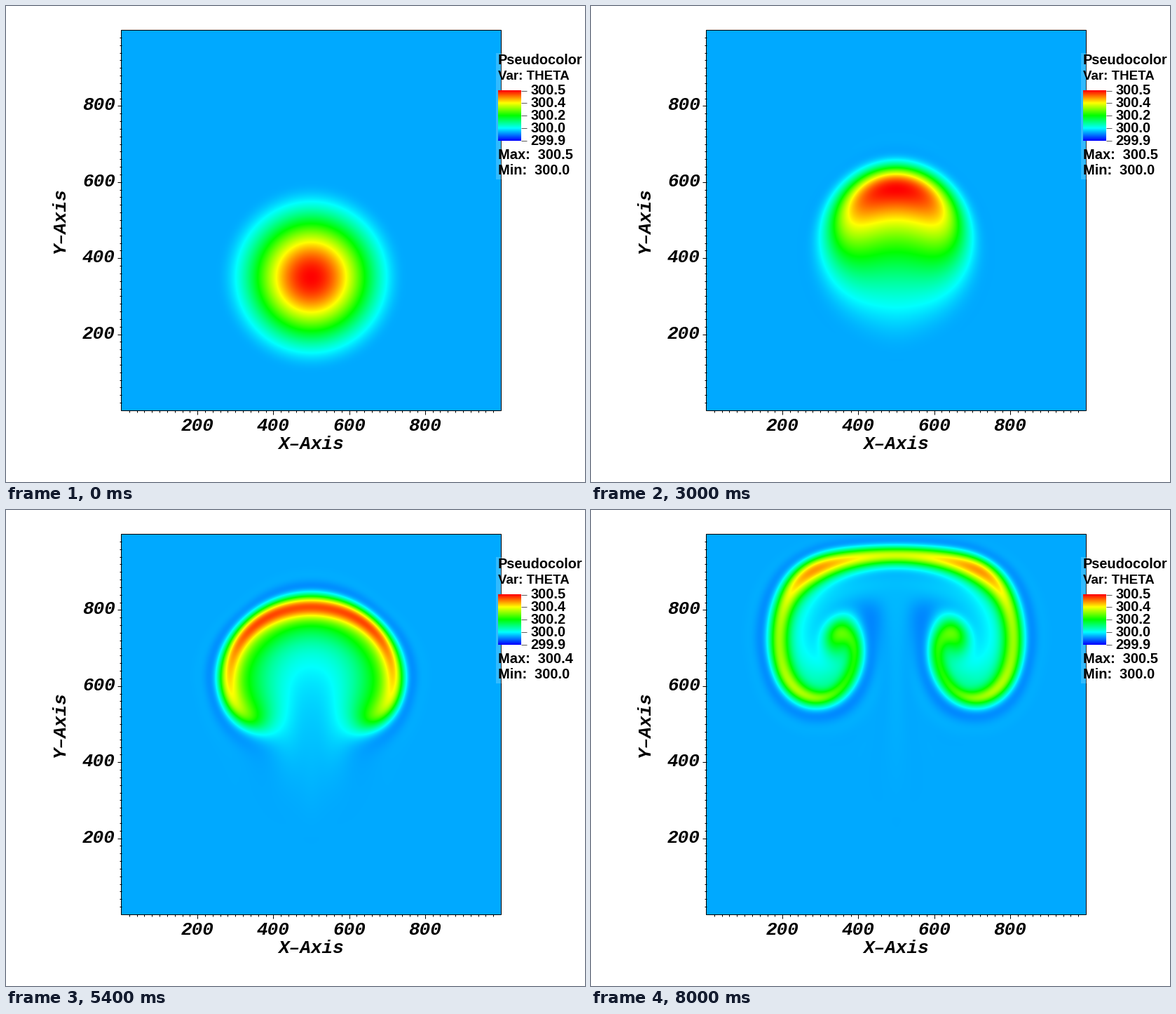
A matplotlib script for the animation above (8200 ms loop, 826x678 px).

```python
import numpy as np
import matplotlib.pyplot as plt
from matplotlib.animation import FuncAnimation
from matplotlib.colors import LinearSegmentedColormap
from matplotlib.patches import Rectangle

W, H, DPI = 826, 678, 100
FRAMES, INTERVAL = 41, 200
LEFT, RIGHT, TOP, BOTTOM = 165, 706, 34, 576

# Rising warm bubble: Boussinesq flow in a closed 1000 m box
N = 100                 # cells per side
CELL = 1000 / N
DT = 3.0                # s
STEPS = 290
BUOYANCY = 9.81 / 300   # g / theta0
HYPER = 15              # weak biharmonic diffusion, m^4/s
UPWIND = 20             # m, spacing of the fifth-order upwind damping

# The vertical axis is mirrored with odd symmetry, which makes the walls.
kx = 2 * np.pi * np.fft.rfftfreq(N, CELL)[None, :]
ky = 2 * np.pi * np.fft.fftfreq(2 * N, CELL)[:, None]
ikx, iky = 1j * kx, 1j * ky
k2 = kx ** 2 + ky ** 2
inv_k2 = 1 / np.where(k2 == 0, 1, k2)
half = np.exp(-HYPER * k2 ** 2 * DT / 2)
full = half ** 2


def damping(k):
    """Sixth difference of a wave, as in a fifth-order upwind scheme."""
    phase = np.minimum(np.abs(k) * UPWIND, np.pi)
    return (2 * np.sin(phase / 2)) ** 6 / (60 * UPWIND)


damp_x, damp_y = damping(kx), damping(ky)


def bubble(x, y):
    r = np.minimum(np.hypot(x - 500, y - 350) / 250, 1)
    return 0.25 * (1 + np.cos(np.pi * r))


def tendency(q):
    psi = -q[1] * inv_k2
    u, v = np.fft.irfft2(np.array([-iky * psi, ikx * psi]))
    qx, qy, dx, dy = np.fft.irfft2(
        np.array([ikx * q, iky * q, damp_x * q, damp_y * q]))
    out = -np.fft.rfft2(u * qx + v * qy + np.abs(u) * dx + np.abs(v) * dy)
    out[1] += BUOYANCY * ikx * q[0]
    return out


def step(q):
    """Runge-Kutta 4 with an integrating factor for the diffusion."""
    a = tendency(q)
    b = tendency(half * (q + DT / 2 * a))
    c = tendency(half * q + DT / 2 * b)
    d = tendency(full * q + DT * half * c)
    return full * q + DT / 6 * (full * a + 2 * half * (b + c) + d)


def simulate():
    x = np.arange(N)[None, :] * CELL
    y = np.arange(2 * N)[:, None] * CELL
    theta = bubble(x, y) - bubble(x, 2000 - y)
    q = np.fft.rfft2(np.array([theta, np.zeros_like(theta)]))
    fields = np.empty((STEPS + 1, N + 1, N + 1))
    for n in range(STEPS + 1):
        if n:
            q = step(q)
        fields[n, :, :N] = np.fft.irfft2(q[0])[:N + 1]
    fields[:, :, N] = fields[:, :, 0]
    return fields


def arrival(height):
    """Step at which the warm front passes a height on the centre line."""
    j, f = divmod(height / CELL, 1)
    j = int(j)
    mid = fields[:, :, N // 2]
    return np.argmax((1 - f) * mid[:, j] + f * mid[:, j + 1] > 0.2)


fields = simulate()

# Playback speed from the front height (m) at a few moments
front = {15: 642, 23: 766, 31: 886, 36: 935}
rate = np.mean([arrival(y) / i for i, y in front.items()])


def field_at(i):
    p = min(i * rate, STEPS - 1)
    j = int(p)
    return fields[j] + (p - j) * (fields[j + 1] - fields[j])


def extremes(i):
    high = 300.4 if 25 <= i < 34 else 300.5
    low = 299.9 if 35 <= i < 39 else 300.0
    return f"Max:  {high:.1f}", f"Min:  {low:.1f}"


fig = plt.figure(figsize=(W / DPI, H / DPI), dpi=DPI, facecolor="white")
cmap = LinearSegmentedColormap.from_list(
    "rainbow5", ["#0000ff", "#00ffff", "#00ff00", "#ffff00", "#ff0000"], 1024)

plot = fig.add_axes([LEFT / W, 1 - BOTTOM / H,
                     (RIGHT - LEFT) / W, (BOTTOM - TOP) / H])
pad = CELL / 2
image = plot.imshow(field_at(0), cmap=cmap, vmin=-0.1, vmax=0.5,
                    origin="lower", aspect="auto", interpolation="bicubic",
                    extent=(-pad, 1000 + pad, -pad, 1000 + pad))
plot.set(xlim=(0, 1000), ylim=(0, 1000))
plot.axis("off")

# Overlay in pixel coordinates, y pointing down
page = fig.add_axes([0, 0, 1, 1])
page.axis("off")
PX = 72 / DPI


def line(x0, y0, x1, y1, width=1):
    page.plot([x0, x1], [y0, y1], color="black", lw=width * PX,
              solid_capstyle="butt")


def label(x, y, text, size, family, **kw):
    kw = {"va": "baseline", **kw}
    return page.text(x, y, text, fontsize=size * PX, family=family,
                     weight="bold", color="black", **kw)


def axis_label(x, y, text, **kw):
    return label(x, y, text, 26, "Liberation Mono", style="italic", **kw)


def legend_label(x, y, text, size=20):
    return label(x, y, text, size, "Liberation Sans", zorder=6)


page.add_patch(Rectangle((LEFT - 1, TOP), RIGHT - LEFT + 1, BOTTOM - TOP,
                         fill=False, ec="black", lw=PX))
for value in range(20, 1000, 20):
    major = value % 200 == 0
    x = LEFT + value / 1000 * (RIGHT - LEFT)
    y = BOTTOM - value / 1000 * (BOTTOM - TOP)
    size = 6 if major else 3
    line(LEFT - size, y, LEFT, y)
    line(x, BOTTOM, x, BOTTOM + size)
    if major:
        axis_label(156, y + 6, str(value), ha="right")
        axis_label(x, 605, str(value), ha="center")
axis_label(435.5, 631, "X\u2013Axis", ha="center")
axis_label(77, 305, "Y\u2013Axis", ha="center", va="center", rotation=90)

page.add_patch(Rectangle((699, 67), 127, 180, fc="white", alpha=0.2,
                         lw=0, zorder=4))
page.imshow(np.linspace(1, 0, 256)[:, None], cmap=cmap, aspect="auto",
            extent=(702, 735, 192, 120), zorder=5)
legend_label(702, 83, "Pseudocolor")
legend_label(702, 105, "Var: THETA", 18.8)
for n, text in enumerate(["300.5", "300.4", "300.2", "300.0", "299.9"]):
    line(735, 120.5 + 17.9 * n, 743, 120.5 + 17.9 * n, 0.8)
    legend_label(748.5, 126 + 17.9 * n, text)
high_text = legend_label(702, 218, "")
low_text = legend_label(702, 239.5, "")
page.set(xlim=(0, W), ylim=(H, 0))


def draw(i):
    image.set_data(field_at(i))
    high, low = extremes(i)
    high_text.set_text(high)
    low_text.set_text(low)
    return image, high_text, low_text


anim = FuncAnimation(fig, draw, frames=FRAMES, interval=INTERVAL, repeat=True)
plt.show()
```
